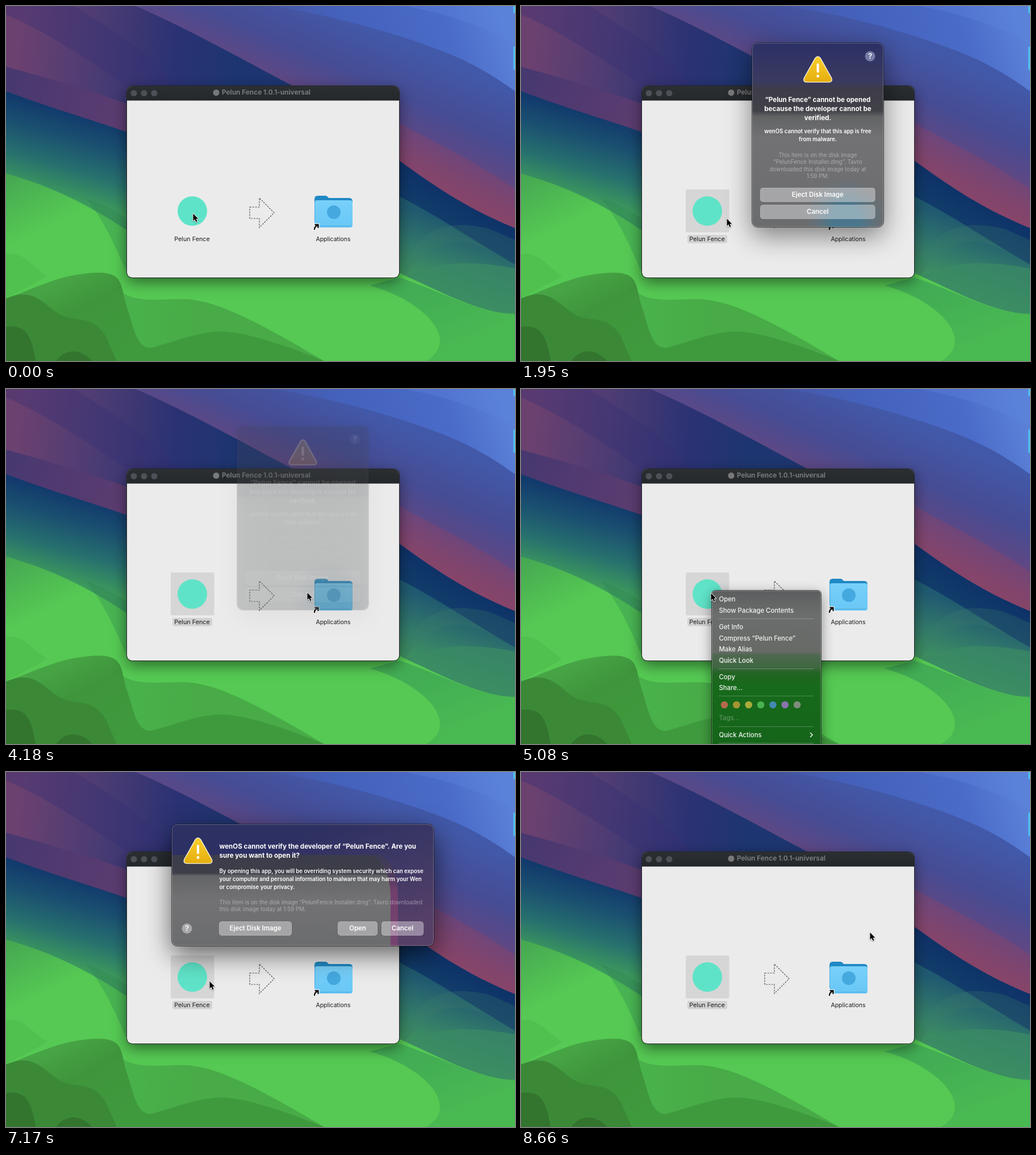
Recreate the animation shown at these times as an HTML page with a canvas. Size 896 px wide and 625 px high, loop 9110 ms.

```html
<!DOCTYPE html>
<html lang="en">
<head>
<meta charset="utf-8">
<title>Opening an unverified app</title>
<style>
html, body { margin: 0; width: 100%; height: 100%; overflow: hidden; background: #55c954; }
canvas { display: block; }
</style>
</head>
<body>
<canvas id="stage" width="896" height="625"></canvas>
<script>
const W = 896, H = 625, LOOP = 9110;
const APP = 'Pelun Fence';
const FONT = 'Inter, "Open Sans", sans-serif';
const ctx = document.getElementById('stage').getContext('2d');
let g = ctx;

// ---------- helpers ----------
function gradient(x0, y0, x1, y1, ...colors) {
  const grad = g.createLinearGradient(x0, y0, x1, y1);
  colors.forEach((c, i) => {
    const [color, at] = c.split('@');
    grad.addColorStop(at === undefined ? i / (colors.length - 1) : +at, color);
  });
  return grad;
}

function shape(path, fill) {
  g.fillStyle = fill;
  g.fill(new Path2D(path));
}

function circle(x, y, r, fill) {
  g.beginPath();
  g.arc(x, y, r, 0, Math.PI * 2);
  g.fillStyle = fill;
  g.fill();
}

function box(x, y, w, h, r, fill) {
  g.beginPath();
  g.roundRect(x, y, w, h, r);
  g.fillStyle = fill;
  g.fill();
}

function outline(x, y, w, h, r, color) {
  g.beginPath();
  g.roundRect(x + 0.5, y + 0.5, w - 1, h - 1, r);
  g.strokeStyle = color;
  g.lineWidth = 1;
  g.stroke();
}

// Dark hairline outside the box, light one inside.
function rim(x, y, w, h, r) {
  outline(x - 1, y - 1, w + 2, h + 2, r, 'rgba(24,24,28,.7)');
  outline(x, y, w, h, r - 1, 'rgba(255,255,255,.24)');
}

function text(str, x, y, size, color, weight = 400, align = 'left') {
  g.font = `${weight} ${size}px ${FONT}`;
  g.textAlign = align;
  g.fillStyle = color;
  g.fillText(str, x, y);
}

function lines(rows, x, y, step, ...style) {
  rows.forEach((row, i) => text(row, x, y + i * step, ...style));
}

function shadow(blur, dy, alpha, draw) {
  g.save();
  g.shadowColor = `rgba(0,0,0,${alpha})`;
  g.shadowBlur = blur;
  g.shadowOffsetY = dy;
  draw();
  g.restore();
}

// ---------- desktop ----------
function drawDesktop() {
  g.fillStyle = gradient(380, 150, 870, 0, '#4a4a92', '#4461ba@.45', '#4a6bc8@.8', '#5b81d7');
  g.fillRect(0, 0, W, H);
  shape('M700 0C760 10 830 30 896 66V0Z', 'rgba(92,132,220,.35)');
  shape('M225 0H470C560 15 640 35 720 62S840 110 896 150V480H505Z',
    gradient(760, 90, 670, 290, '#4259a9', '#464c94@.4', '#5b4886@.65', '#84466a'));
  shape('M692 205C740 235 810 262 896 322V400H692Z',
    gradient(780, 240, 740, 310, 'rgba(130,68,110,.4)', 'rgba(136,68,104,.8)'));

  // left slopes
  shape('M0 0H228C310 35 400 85 505 141V300H0Z',
    gradient(20, 70, 400, 110, '#6b4170', '#4d3c73@.35', '#2b3273@.72', '#1d3570'));
  shape('M0 0H120C200 50 260 90 300 141H213C140 90 60 40 0 15Z', 'rgba(52,48,116,.35)');
  shape('M0 107C80 128 150 150 213 172V300H0Z',
    gradient(0, 120, 213, 200, '#473870', '#5c3c70'));
  shape('M0 150C80 180 150 200 213 222V500H0Z',
    gradient(80, 178, 40, 320, '#123a6c', '#1a5070@.3', '#27706e@.65', '#3c9a5c'));

  // right slopes
  shape('M692 272C745 310 805 354 896 391V500H692Z',
    gradient(780, 310, 730, 400, '#0d2f67', '#14446c'));
  shape('M692 335C770 375 830 418 896 455V580H692Z',
    gradient(780, 380, 740, 500, '#205a70', '#337a6a@.5', '#429a5c'));
  shape('M700 478C715 400 765 372 850 392L896 412V455C830 418 775 378 700 478Z', 'rgba(60,125,105,.25)');
  shape('M702 478C760 445 830 450 896 462V540C820 545 745 525 702 478Z', 'rgba(58,138,100,.75)');

  // meadow
  shape('M0 295C70 315 130 340 213 395V470H692C760 500 830 540 896 543V625H0Z',
    gradient(0, 300, 50, 400, '#46a752', '#55c953'));
  shape('M140 338C175 350 200 365 213 375V470C195 430 175 380 140 338Z', 'rgba(45,125,80,.3)');
  shape('M692 478C760 500 830 540 896 543V625H740C800 590 740 520 640 492Z',
    gradient(750, 500, 790, 600, '#42ad54', '#49b952'));
  shape('M0 437C30 432 45 458 72 475C50 490 25 500 0 515Z', '#50c04f');
  shape('M190 490C215 525 260 516 310 516S420 545 500 590L560 625H190Z',
    gradient(210, 550, 330, 560, '#49b24b', '#48ab47'));
  shape('M0 515C50 498 90 474 150 470S200 490 213 530S230 602 255 602C300 590 340 573 380 573S500 600 560 625H0Z',
    gradient(120, 470, 200, 620, '#47a445', '#3f953b@.35', '#3f9a3d'));
  shape('M0 515C45 495 62 520 90 540S150 540 175 580L195 625H0Z', '#3b8937');
  shape('M0 565C35 560 45 580 52 625H0Z', '#33752f');
  shape('M88 625C105 603 130 602 152 625Z', '#33752f');

  box(893, -10, 10, 23, 3, '#4fc0ee');
  box(893, 71, 10, 42, 3, '#4fc0ee');
}

// ---------- installer window ----------
function drawFolder() {
  shape('M543 340Q543 334 549 334H562Q565 334 568 338H604Q610 338 610 344V380H543Z', '#2089c4');
  box(543.5, 342, 66.5, 48, 4, gradient(0, 342, 0, 390, '#78d0fa', '#69c7f6'));
  g.fillStyle = '#4fa9db';
  g.fillRect(545, 387, 63, 1);
  circle(577, 363, 12, '#45a9e0');
  g.lineCap = 'round';
  for (const [color, width] of [['#fff', 4.5], ['#111', 2.4]]) {
    g.strokeStyle = color;
    g.lineWidth = width;
    g.stroke(new Path2D('M543 393Q543 388 549 386M544.5 385H549.5V390'));
  }
  g.lineCap = 'butt';
}

function drawWindow() {
  shadow(26, 8, 0.5, () => box(213, 141, 479, 337, 9, '#ebebeb'));
  box(213, 141, 479, 25.5, [9, 9, 0, 0], gradient(0, 141, 0, 166, '#2b2f32', '#25282b'));
  outline(212, 140, 481, 339, 9, '#24272a');
  for (const x of [225, 243, 261]) circle(x, 153.5, 5.5, '#4d5057');
  circle(370, 152.5, 5.5, '#77797b');
  text(APP + ' 1.0.1-universal', 380, 156, 11.8, '#77797b', 700);

  g.setLineDash([3, 1.8]);
  g.strokeStyle = '#555';
  g.lineWidth = 1.2;
  g.stroke(new Path2D('M429 354H446V338L472 364L446 390V374H429Z'));
  g.setLineDash([]);
  drawFolder();
  text('Applications', 576, 414, 10.5, '#1c1c1c', 400, 'center');
}

function drawApp(selected) {
  if (selected) {
    box(290, 323, 76.5, 75.5, 2, '#d6d6d6');
    box(293, 403, 70, 14.5, 3, '#d2d2d2');
  }
  circle(328, 361, 26, '#5fe3c8');
  text(APP, 327.5, 414, 10.8, '#1c1c1c', 400, 'center');
}

// ---------- context menu ----------
const MENU = [
  [15, 'Open'], [34.5, 'Show Package Contents'], [64, 'Get Info'],
  [83.5, `Compress “${APP}”`], [103, 'Make Alias'], [122.5, 'Quick Look'],
  [152, 'Copy'], [171, 'Share...'], [224, 'Tags...'], [254, 'Quick Actions']
];
const TAGS = ['#b5694b', '#a59533', '#a8ac3a', '#48b44f', '#428ab0', '#8774ac', '#7e8d7b'];

function drawMenu(x, y, hot, alpha) {
  g.save();
  g.globalAlpha = alpha;
  const fill = gradient(0, 355, 0, 625, '#5c5d5e', '#6c6d6d@.16', '#676a67@.4',
    '#4f6850@.42', '#3e6740@.5', '#216422@.54', '#176a1b@.62', '#15641a');
  shadow(22, 6, 0.45, () => box(x, y, 192, 310, 6, fill));
  rim(x, y, 192, 310, 6);
  if (hot) box(x + 5, y + 5, 182, 20, 4, '#5a8ee9');
  g.fillStyle = 'rgba(255,255,255,.24)';
  for (const dy of [49, 137, 185, 239, 268]) g.fillRect(x + 12, y + dy, 167, 1);
  for (const [dy, label] of MENU) {
    const color = label === 'Tags...' ? 'rgba(255,255,255,.3)' : '#f2f4f2';
    text(label, x + 12.5, y + dy + 4, 11.3, color, 450);
  }
  TAGS.forEach((c, i) => circle(x + 22 + i * 21.35, y + 201, 6.3, c));
  g.strokeStyle = '#f2f4f2';
  g.lineWidth = 1.5;
  g.stroke(new Path2D(`M${x + 173} ${y + 250}l4 4l-4 4`));
  g.restore();
}

// ---------- alerts ----------
function drawWarning(x, y) {
  g.save();
  g.translate(x, y);
  const tri = new Path2D('M-4 4Q0 -1 4 4L23.5 39Q26 45.5 19 45.5H-19Q-26 45.5 -23.5 39Z');
  g.lineJoin = 'round';
  g.lineWidth = 2.6;
  g.strokeStyle = '#f5f2e6';
  g.stroke(tri);
  g.fillStyle = gradient(0, 0, 0, 46, '#fad02f', '#e5ae0d');
  g.fill(tri);
  box(-2, 13, 4, 16.5, 2, '#fff');
  circle(0, 35.5, 2.4, '#fff');
  g.restore();
}

function drawHelp(x, y, color) {
  circle(x, y, 9, color);
  text('?', x, y + 4.8, 13, '#fff', 600, 'center');
}

function drawButton(x, y, w, label, pressed) {
  box(x, y, w, 25, 5, pressed ? 'rgba(255,255,255,.62)' : 'rgba(255,255,255,.38)');
  outline(x, y, w, 25, 5, 'rgba(255,255,255,.12)');
  text(label, x + w / 2, y + 16, 11.4, '#fff', 600, 'center');
}

function panel(x, y, w, h, state, draw) {
  const cx = x + w / 2, cy = y + h / 2;
  g.save();
  g.globalAlpha = state.alpha;
  g.translate(cx, cy);
  g.scale(state.scale, state.scale);
  g.translate(-cx, -cy);
  shadow(46, 15, 0.6 * state.shade, () => box(x, y, w, h, 10, '#55565a'));
  g.save();
  g.beginPath();
  g.roundRect(x, y, w, h, 10);
  g.clip();
  draw();
  g.restore();
  rim(x, y, w, h, 10);
  g.restore();
}

const TITLE = [11.6, '#fff', 700];
const BODY = [9.62, '#fff', 600];
const NOTE = [9.9, 'rgba(235,235,240,.48)', 400];

function drawBlocked(state, pressed) {
  panel(407, 65, 231, 324, state, () => {
    g.fillStyle = gradient(0, 65, 0, 389, '#2b3065', '#3b3a60@.21', '#3d3c48@.25', '#414148@.37',
      '#626365@.4', '#727274@.52', '#6b6c6e');
    g.fillRect(407, 65, 231, 324);
    const haze = g.createRadialGradient(572, 375, 25, 572, 375, 72);
    haze.addColorStop(0, 'rgba(62,122,150,.75)');
    haze.addColorStop(1, 'rgba(90,120,135,0)');
    g.fillStyle = haze;
    g.fillRect(490, 295, 148, 94);

    drawWarning(522.5, 88);
    drawHelp(614.5, 88.5, '#777ba8');
    lines([`“${APP}” cannot be opened`, 'because the developer cannot be', 'verified.'],
      522.5, 168.5, 16, ...TITLE, 'center');
    lines(['wenOS cannot verify that this app is free', 'from malware.'],
      522.5, 224, 14, ...BODY, 'center');
    lines(['This item is on the disk image', '“PelunFence Installer.dmg”. Tavro',
      'downloaded this disk image today at', '1:59 PM.'],
      522.5, 266, 12.4, ...NOTE, 'center');
    drawButton(421, 320, 202.5, 'Eject Disk Image');
    drawButton(421, 350, 202.5, 'Cancel', pressed);
  });
}

function drawConfirm(state, pressed) {
  panel(292, 92, 461, 214, state, () => {
    g.fillStyle = gradient(560, 92, 640, 306, '#2d3062', '#3d3865@.45', '#574068');
    g.fillRect(292, 92, 461, 214);
    shape('M292 146H660Q690 165 690 220V306H292Z',
      gradient(0, 146, 0, 306, '#3c3b54', '#4a3b5c@.2', '#713f6c@.4', '#76436f'));
    shape('M292 146H645Q676 165 677 220V306H292Z',
      gradient(0, 146, 0, 306, '#3c3d4b', '#3d3e48@.2', '#646567@.23', '#727274@.5', '#6b6c6e'));

    drawWarning(338, 115);
    drawHelp(318.5, 275.5, '#a9a9ab');
    lines([`wenOS cannot verify the developer of “${APP}”. Are you`, 'sure you want to open it?'],
      375.5, 134.5, 16, ...TITLE);
    lines(['By opening this app, you will be overriding system security which can expose',
      'your computer and personal information to malware that may harm your Wen',
      'or compromise your privacy.'], 375.5, 177.5, 14.1, ...BODY);
    lines(['This item is on the disk image “PelunFence Installer.dmg”. Tavro downloaded',
      'this disk image today at 1:59 PM.'], 375.5, 233, 12.4, ...NOTE);
    drawButton(375, 263, 128, 'Eject Disk Image');
    drawButton(584, 263, 70, 'Open', pressed);
    drawButton(661, 263, 74, 'Cancel');
  });
}

// ---------- pointer ----------
const POINTER = [
  [0, 329, 365], [1, 328, 365], [4, 328, 365], [8, 362, 374], [16, 362, 374], [22, 530, 358],
  [28, 530, 358], [32, 334, 359], [36, 334, 359], [41, 358, 368], [50, 358, 368], [54, 614, 282]
];

function pointerAt(n) {
  const i = POINTER.findIndex(k => k[0] > n);
  if (i < 0) return POINTER[POINTER.length - 1].slice(1);
  const [n0, x0, y0] = POINTER[i - 1], [n1, x1, y1] = POINTER[i];
  const p = (n - n0) / (n1 - n0), e = p * p * (3 - 2 * p);
  return [x0 + (x1 - x0) * e, y0 + (y1 - y0) * e];
}

function drawPointer(n) {
  const [x, y] = pointerAt(n);
  g.save();
  g.translate(x, y);
  const arrow = new Path2D('M.5 .5V13.2L3.4 10.5L5.4 15.2L7.5 14.3L5.5 9.8H9.4Z');
  g.lineJoin = 'round';
  g.lineWidth = 1.8;
  g.strokeStyle = '#fff';
  shadow(2, 1, 0.35, () => g.stroke(arrow));
  g.fillStyle = '#000';
  g.fill(arrow);
  g.restore();
}

// ---------- timeline ----------
function tickAt(t) {
  const lost = [2540, 3130, 6720, 8360].filter(cut => t >= cut).length;
  return Math.floor((t + lost * 10) / 150);
}

function alertState(n, start, end) {
  if (n < start || n > end) return null;
  if (n === end) return { alpha: 0.15, scale: 1, shade: 0.5 };
  const age = n - start;
  return {
    alpha: [0.35, 0.85][age] ?? 1,
    scale: [0.86, 0.97][age] ?? 1,
    shade: Math.min(1, 0.4 + age * 0.2)
  };
}

function render(n) {
  ctx.drawImage(backdrop, 0, 0);
  drawApp(n >= 3);
  if (n >= 3 && n <= 10) drawMenu(331, 361, n >= 6 && n <= 8, n === 10 ? 0.06 : 1);
  if (n >= 34 && n <= 44) drawMenu(336, 355, n >= 38 && n <= 42, n === 44 ? 0.06 : 1);
  const blocked = alertState(n, 11, 28), confirm = alertState(n, 45, 56);
  if (blocked) drawBlocked(blocked, n === 27);
  if (confirm) drawConfirm(confirm, n === 55);
  drawPointer(n);
}

const backdrop = document.createElement('canvas');
backdrop.width = W;
backdrop.height = H;
g = backdrop.getContext('2d');
drawDesktop();
drawWindow();
g = ctx;

const began = performance.now();
let shown = -1;
function loop() {
  const n = tickAt((performance.now() - began) % LOOP);
  if (n !== shown) render(shown = n);
  requestAnimationFrame(loop);
}
loop();
</script>
</body>
</html>
```
